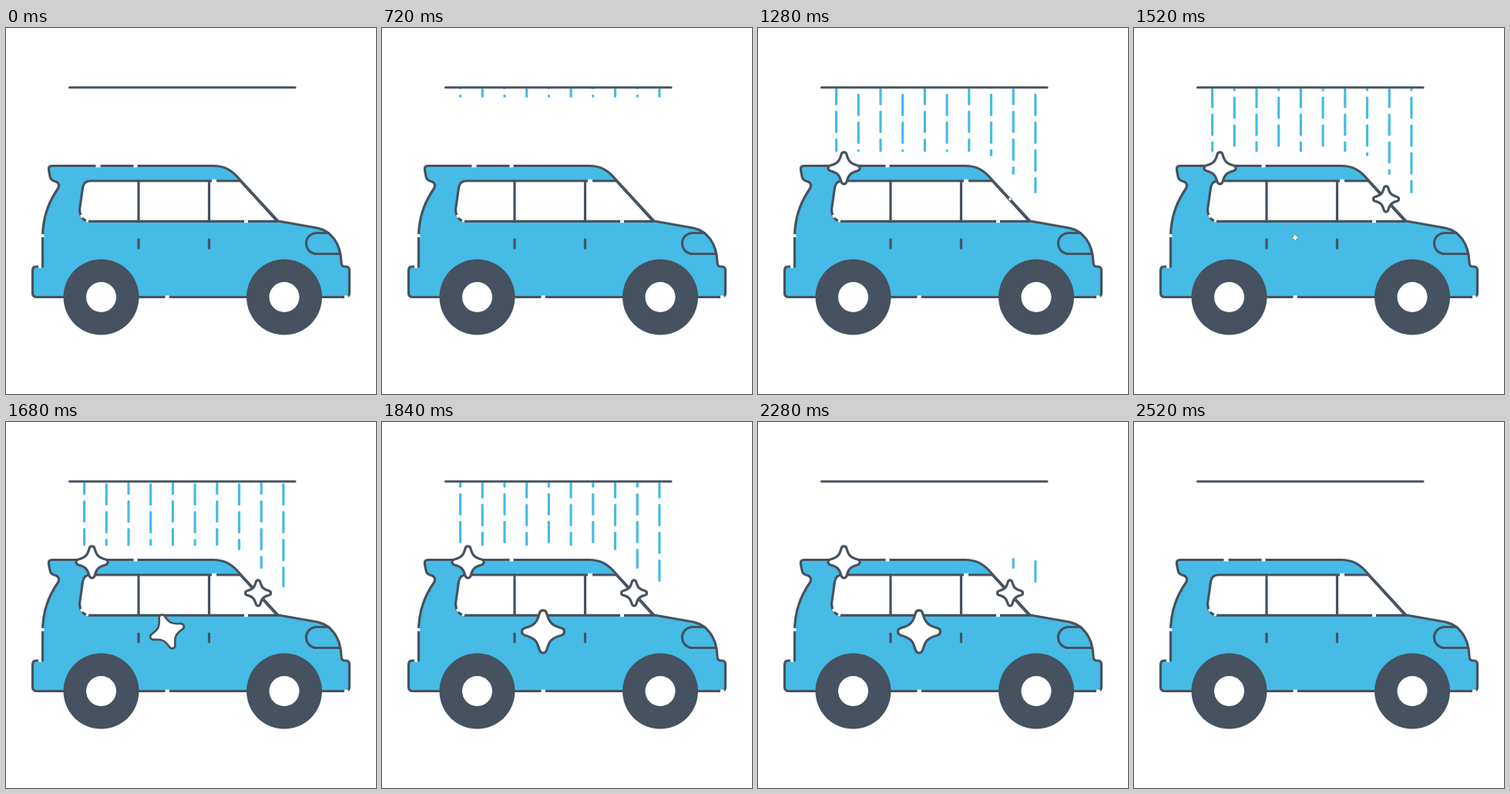
An HTML page with a canvas for the animation above (2560 ms loop, 480x474 px).

```html
<!DOCTYPE html>
<html lang="en">
<head>
<meta charset="utf-8">
<title>Car wash</title>
<style>
  html, body { margin: 0; width: 100%; height: 100%; overflow: hidden; background: #fff; }
  canvas { display: block; width: 480px; height: 474px; }
</style>
</head>
<body>
<canvas id="stage" width="480" height="474"></canvas>
<script>
const ctx = document.getElementById('stage').getContext('2d');
const BLUE = '#45bbe6', DARK = '#46525f', WHITE = '#fff';
const LOOP = 2560, STEP = 40;

const body = new Path2D(
  'M60 178.500H268C284 178.500 293 184 304 197L353 250L404 259C422 263 434 279 435 303' +
  'Q435 309 439 309H441Q445.500 309 445.500 314V343Q445.500 348.500 440 348.500H40' +
  'Q34.500 348.500 34.500 343V314Q34.500 309 39 309H47.500V272' +
  'C47.500 242 57 223 68 207C70 202 67 199 62 198Q58 197 57 192L55.500 184Q54.500 178.500 60 178.500Z');
const glass = new Path2D(
  'M109 198H304L352 250.300H109Q96 250 95.500 235L99.500 207Q101 198 109 198Z');
const trim = new Path2D(
  'M172 198V250M263.500 198V250M172 274V285M263.500 274V285' +
  'M419 265.500H403A13.500 13.500 0 0 0 403 292.500H433');
const outlineGaps = new Path2D(
  'M116.500 178.500H122.500M165.500 178.500H170.500M267 198H273M309 250.300H314' +
  'M47.500 267V271M42 309H46M206.500 348.500H212M439 348.500H444M97.500 242L99.500 245.500M104 249L107 250');

const star = new Path2D();
star.moveTo(0.17, -0.86);
for (let i = 0; i < 4; i++) {
  const a = i * Math.PI / 2, c = Math.cos(a), s = Math.sin(a);
  const turn = (x, y) => [x * c - y * s, x * s + y * c];
  star.bezierCurveTo(...turn(0.29, -0.42), ...turn(0.42, -0.29), ...turn(0.86, -0.17));
  star.bezierCurveTo(...turn(1.05, -0.12), ...turn(1.05, 0.12), ...turn(0.86, 0.17));
}
star.closePath();

const sparkles = [
  { x: 111.5, y: 181.5, r: 20.5, start: 1000 },
  { x: 327, y: 221.5, r: 16.5, start: 1240 },
  { x: 209, y: 271.5, r: 27.5, start: 1480 }
];

const clamp01 = v => Math.max(0, Math.min(1, v));

function stroke(path, color, width = 3.2, cap = 'round') {
  ctx.strokeStyle = color;
  ctx.lineWidth = width;
  ctx.lineCap = cap;
  ctx.lineJoin = 'round';
  ctx.stroke(path);
}

function disc(x, y, r, color) {
  ctx.fillStyle = color;
  ctx.beginPath();
  ctx.arc(x, y, r, 0, Math.PI * 2);
  ctx.fill();
}

function drawCar() {
  ctx.fillStyle = BLUE;
  ctx.fill(body);
  ctx.fillStyle = WHITE;
  ctx.fill(glass);
  stroke(body, DARK);
  stroke(glass, DARK);
  stroke(trim, DARK);
  stroke(outlineGaps, WHITE, 3.8, 'butt');
  for (const x of [123.5, 361]) {
    disc(x, 348.5, 49, DARK);
    disc(x, 348.5, 19.5, WHITE);
  }
}

function drawRain(t) {
  const period = 36, dash = 29, speed = 0.166;
  const top = 78 + Math.max(0, 0.3 * (t - 1953));
  const front = 78 + 0.3 * (t - 680);
  ctx.fillStyle = BLUE;
  for (let i = 0; i < 10; i++) {
    const floor = i < 7 ? 160.5 : [166, 190, 214][i - 7];
    const bottom = Math.min(front, floor);
    const shift = (i % 2 ? 64 : 86) + speed * (t - 720);
    for (let y = 42 + (shift - 42) % period; y < bottom; y += period) {
      const from = Math.max(y, top), to = Math.min(y + dash, bottom);
      if (to <= from) continue;
      ctx.beginPath();
      ctx.roundRect(100 + i * 28.7, from, 3.2, to - from, Math.min(1.5, (to - from) / 2));
      ctx.fill();
    }
  }
}

function drawSparkle({ x, y, r, start }, t) {
  const grow = clamp01((t - start) / 240);
  const shrink = clamp01((2520 - t) / 160);
  const scale = Math.min(grow, shrink);
  if (scale <= 0) return;
  ctx.save();
  ctx.translate(x, y);
  ctx.rotate(-(1 - scale) * Math.PI * 2 / 3);
  ctx.scale(r * scale, r * scale);
  ctx.fillStyle = WHITE;
  ctx.fill(star);
  stroke(star, DARK, 3.2 / r);
  ctx.restore();
}

function draw(t) {
  ctx.fillStyle = WHITE;
  ctx.fillRect(0, 0, 480, 474);
  drawCar();
  if (t >= 720) drawRain(t);
  stroke(new Path2D('M82.500 77H375'), DARK);
  for (const s of sparkles) drawSparkle(s, t);
}

const origin = performance.now();
function frame() {
  const t = (performance.now() - origin) % LOOP;
  draw(Math.floor(t / STEP) * STEP);
  requestAnimationFrame(frame);
}
frame();
</script>
</body>
</html>
```
